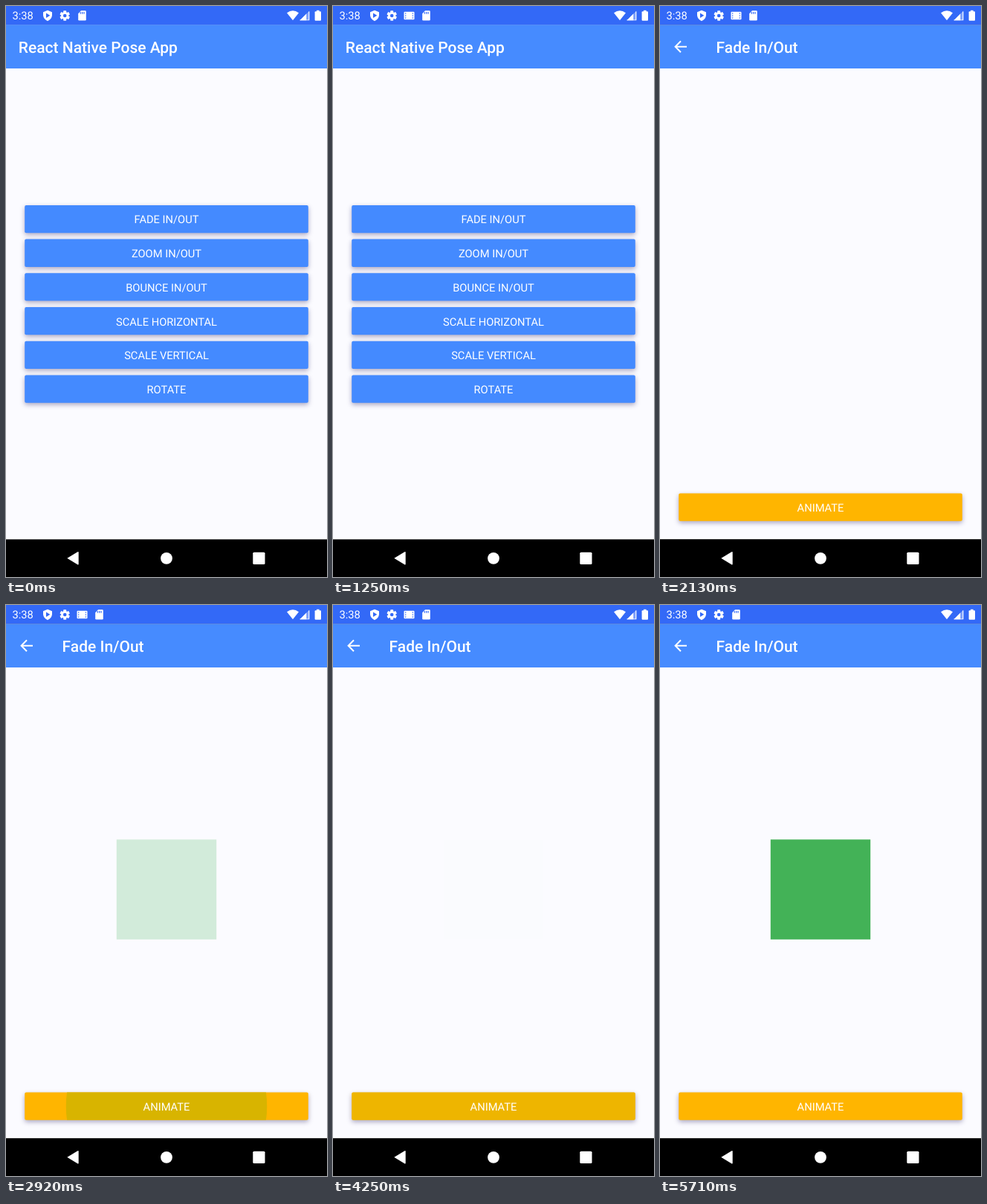
These frames come from a looping animation (432x768 px, 5.75 s). An HTML page with a canvas:

```html
<!DOCTYPE html>
<html lang="en">
<head>
<meta charset="utf-8">
<title>Pose App</title>
<style>
  html, body { margin: 0; width: 100%; height: 100%; overflow: hidden; background: #000; }
  canvas { display: block; }
</style>
</head>
<body>
<canvas id="stage" width="432" height="768"></canvas>
<script>
const ctx = document.getElementById('stage').getContext('2d');
const LOOP = 5750, W = 432;
const TOP = 25.2, HEADER = 58.8, BOTTOM = 717.6, AREA = BOTTOM - TOP;
const BUTTON = { x: 25.2, w: 381.6, h: 37.3, pitch: 45.7 };
const NAV_START = 1478, NAV_TIME = 425;
const LABELS = ['FADE IN/OUT', 'ZOOM IN/OUT', 'BOUNCE IN/OUT', 'SCALE HORIZONTAL', 'SCALE VERTICAL', 'ROTATE'];
const COLOR = {
  page: '#fbfbff', header: '#468bff', status: '#3369f7', blue: '#448aff',
  amber: '#ffb500', green: '#43b257', blueRipple: '#3a76d9', amberRipple: '#d8b400'
};
const LIST_TAP = { at: 1440, x: 216 };
const TAPS = [
  { at: 2920, x: 216, show: true },
  { at: 4000, x: 195, show: false },
  { at: 5000, x: 165, show: true }
];

const clamp = v => Math.min(1, Math.max(0, v));
const mix = (a, b, k) => a + (b - a) * k;
const easeOut = k => 1 - (1 - k) ** 2;

function bezier(x1, y1, x2, y2) {
  const axis = (a, b, s) => 3 * a * s * (1 - s) ** 2 + 3 * b * s * s * (1 - s) + s ** 3;
  return x => {
    if (x <= 0 || x >= 1) return clamp(x);
    let lo = 0, hi = 1;
    for (let i = 0; i < 24; i++) {
      const mid = (lo + hi) / 2;
      if (axis(x1, x2, mid) < x) lo = mid; else hi = mid;
    }
    return axis(y1, y2, lo);
  };
}
const revealEase = bezier(0.35, 0.45, 0, 1);
const rippleEase = bezier(0.4, 0, 0.2, 1);

function rect(x, y, w, h, color) {
  ctx.fillStyle = color;
  ctx.fillRect(x, y, w, h);
}

function roundRect(x, y, w, h, r, color) {
  ctx.fillStyle = color;
  ctx.beginPath();
  ctx.roundRect(x, y, w, h, r);
  ctx.fill();
}

function circle(x, y, r, color) {
  ctx.fillStyle = color;
  ctx.beginPath();
  ctx.arc(x, y, r, 0, Math.PI * 2);
  ctx.fill();
}

function shape(path, color = '#fff') {
  ctx.fillStyle = color;
  ctx.fill(new Path2D(path));
}

function text(str, x, y, size, weight = 400, align = 'left') {
  ctx.font = `${weight} ${size}px Roboto, sans-serif`;
  ctx.textRendering = 'geometricPrecision';
  ctx.textAlign = align;
  ctx.fillStyle = '#fff';
  ctx.fillText(str, x, y);
}

function layer(draw) {
  ctx.save();
  draw();
  ctx.restore();
}

function ripple(y, tap, t, color) {
  const age = t - tap.at + 58;
  if (t < tap.at || age > 375) return;
  const grow = rippleEase(clamp(age / 225));
  layer(() => {
    ctx.beginPath();
    ctx.roundRect(BUTTON.x, y, BUTTON.w, BUTTON.h, 2);
    ctx.clip();
    ctx.globalAlpha = clamp(age / 50) * (1 - clamp((age - 225) / 150));
    circle(mix(tap.x, 216, grow), y + BUTTON.h / 2, mix(114.6, 192, grow), color);
  });
}

function button(label, y, color, rippleColor, taps, t) {
  layer(() => {
    ctx.shadowColor = 'rgba(50,40,100,.4)';
    ctx.shadowBlur = 6;
    ctx.shadowOffsetY = 2.5;
    roundRect(BUTTON.x, y, BUTTON.w, BUTTON.h, 2, color);
  });
  for (const tap of taps) ripple(y, tap, t, rippleColor);
  text(label, 216, y + BUTTON.h / 2 + 5.9, 14.7, 400, 'center');
}

function page(title, titleX) {
  rect(0, TOP, W, AREA, COLOR.page);
  rect(0, TOP, W, HEADER, COLOR.header);
  text(title, titleX, 63, 21, 500);
}

function listScreen(t) {
  page('React Native Pose App', 16.8);
  LABELS.forEach((label, i) =>
    button(label, 267.9 + i * BUTTON.pitch, COLOR.blue, COLOR.blueRipple, i ? [] : [LIST_TAP], t));
}

function squareOpacity(t) {
  const tap = TAPS.filter(p => t >= p.at).pop();
  if (!tap) return 0;
  const k = easeOut(clamp((t - tap.at + 34) / 300));
  return tap.show ? k : 1 - k;
}

function fadeScreen(t) {
  page('Fade In/Out', 75.6);
  ctx.strokeStyle = '#fff';
  ctx.lineWidth = 2;
  ctx.stroke(new Path2D('M36 54.8H21M28 47.3L20.6 54.8L28 62.3'));
  layer(() => {
    ctx.globalAlpha = squareOpacity(t);
    rect(148.8, 315.4, 134.4, 134.4, COLOR.green);
  });
  button('ANIMATE', 655.4, COLOR.amber, COLOR.amberRipple, TAPS, t);
}

function gear(x, y) {
  for (let i = 0; i < 6; i++) {
    layer(() => {
      ctx.translate(x, y);
      ctx.rotate(i * Math.PI / 3);
      roundRect(-2, -6.8, 4, 5, 0.8, '#fff');
    });
  }
  circle(x, y, 5.1, '#fff');
  circle(x, y, 2.3, COLOR.status);
}

function filmIcon(k) {
  if (k <= 0) return;
  layer(() => {
    ctx.globalAlpha = k;
    ctx.translate(102.5, 13);
    ctx.scale(k, k);
    roundRect(-7, -5.3, 14, 10.6, 1, '#fff');
    for (const x of [-5.5, 4.2]) {
      for (const y of [-3.6, -0.6, 2.4]) rect(x, y, 1.3, 1.3, COLOR.status);
    }
  });
}

function sdCard(x) {
  layer(() => {
    ctx.translate(x, 0);
    shape('M-1.5 6.3H4Q5.3 6.3 5.3 7.6V18.2Q5.3 19.5 4 19.5H-4Q-5.3 19.5-5.3 18.2V10.2Z');
    for (const dx of [-2.4, 0, 2.4]) rect(dx - 0.5, 8, 1.2, 2.7, COLOR.status);
  });
}

function statusBar(t) {
  rect(0, 0, W, TOP, COLOR.status);
  text('3:38', 8.5, 18.2, 14.7);
  shape('M56 5.8L62 8.2V12.6Q61.6 17.8 56 20.2Q50.4 17.8 50 12.6V8.2Z');
  shape('M54 9.6L59.3 12.8L54 16Z', COLOR.status);
  gear(79.2, 13);
  const film = rippleEase(clamp((t - 1000) / 180)) * (1 - rippleEase(clamp((t - 5560) / 150)));
  filmIcon(film);
  sdCard(mix(102.5, 125.5, film));
  shape('M378 9.2Q386 3.2 394 9.2L386 19.2Z');
  shape('M408.3 6.4V19.2H395.5Z', 'rgba(255,255,255,.35)');
  shape('M404.2 10.5V19.2H395.5Z');
  shape('M407.2 7.5H408.3V19.2H395.5V18.4H407.2Z');
  roundRect(415.6, 7.2, 8.4, 12.5, 1, '#fff');
  rect(418, 5.8, 3.6, 2, '#fff');
}

function navigationBar() {
  rect(0, BOTTOM, W, 768 - BOTTOM, '#000');
  shape('M82.3 742.8L96.3 734.3Q97.7 733.6 97.7 735.1V750.5Q97.7 752 96.3 751.3Z');
  circle(216, 742.8, 7.9, '#fff');
  roundRect(332.3, 734.8, 16.2, 16.2, 1.5, '#fff');
}

function draw(t) {
  const p = revealEase(clamp((t - NAV_START) / NAV_TIME));
  if (p < 1) {
    layer(() => {
      ctx.translate(0, -0.02 * AREA * p);
      listScreen(t);
    });
    rect(0, TOP, W, AREA, `rgba(0,0,0,${0.14 * clamp(p / 0.36)})`);
  }
  if (p > 0) {
    // The wipe edge rises while the content itself shifts only slightly.
    layer(() => {
      ctx.beginPath();
      ctx.rect(0, TOP + AREA * (1 - p), W, AREA);
      ctx.clip();
      ctx.translate(0, 0.041 * AREA * (1 - p));
      fadeScreen(t);
    });
  }
  statusBar(t);
  navigationBar();
}

function tick() {
  ctx.clearRect(0, 0, W, 768);
  draw(performance.now() % LOOP);
  requestAnimationFrame(tick);
}
tick();
</script>
</body>
</html>
```
